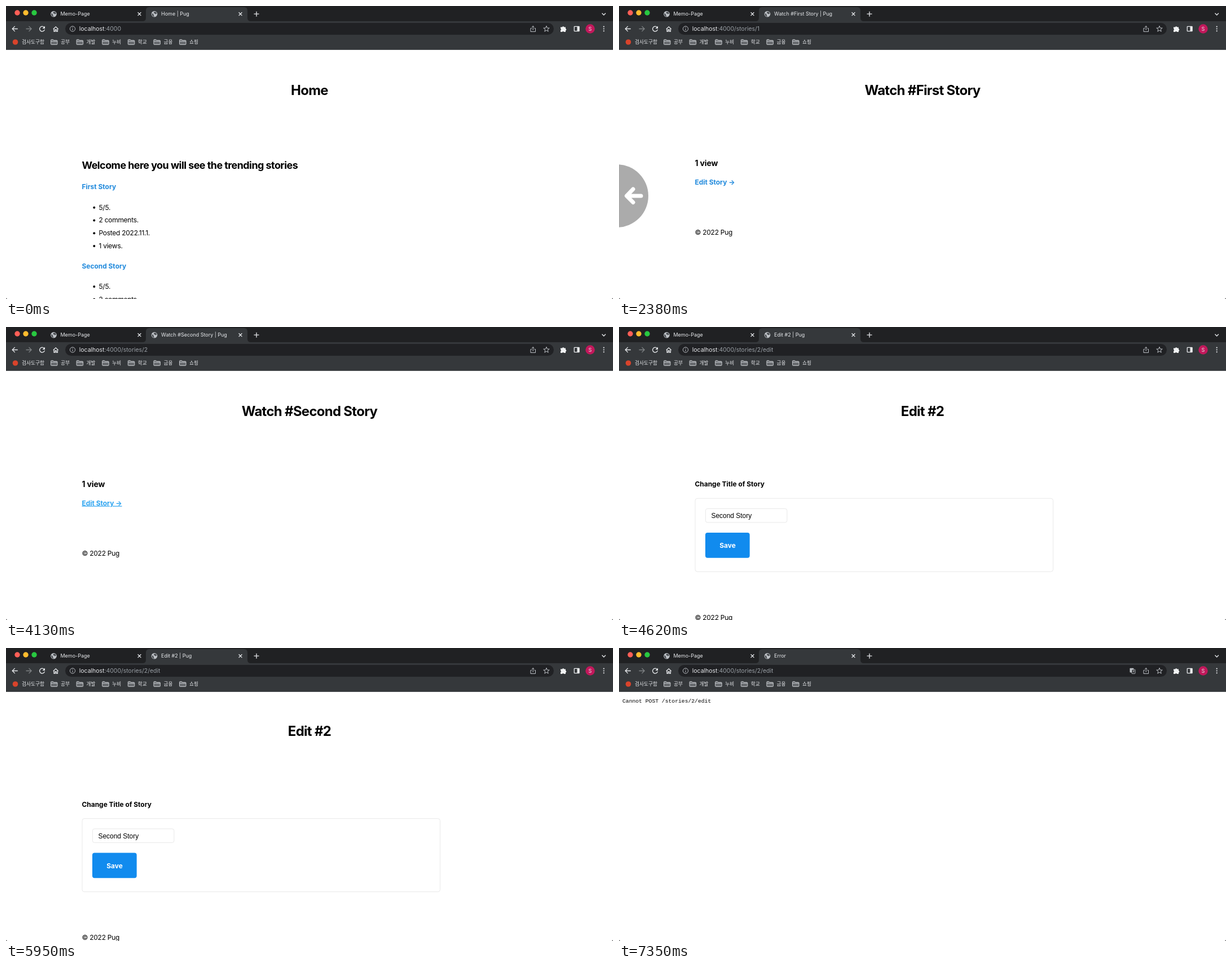
An HTML page that plays this animation: 1076x520 px, repeating every 9.03 s.

```html
<!DOCTYPE html>
<html lang="en">
<head>
<meta charset="utf-8">
<title>Browser walkthrough</title>
<style>
  html, body { margin: 0; width: 100%; height: 100%; overflow: hidden; background: #202124; }
  svg { display: block; width: 1076px; height: 520px; font: 11.95px Inter, sans-serif; }
  text { white-space: pre; }
  .h1 { font-size: 23.9px; font-weight: 700; letter-spacing: -.028em; text-anchor: middle; }
  .h2 { font-size: 17.93px; font-weight: 700; letter-spacing: -.03em; }
  .h3 { font-size: 13.98px; font-weight: 700; letter-spacing: -.01em; }
  .body { letter-spacing: -.02em; }
  .bold { font-weight: 700; }
  .link { font-weight: 700; fill: #1f89dc; }
  .hover { fill: #2ba3f0; text-decoration: underline; }
  .field { font-family: "Liberation Sans", Arial, sans-serif; }
  .mono { font: 9.71px "Liberation Mono", monospace; }
  .tab { font-size: 8.97px; fill: #e8eaed; }
  .url { font-size: 10.46px; fill: #9aa0a6; }
  .mark { font: 500 8.7px "Noto Sans CJK KR", "Noto Sans CJK", sans-serif; fill: #e8eaed; }
  .icon { fill: none; stroke: #e8eaed; stroke-width: 1.3; }
  .soft { stroke: #bdc1c6; stroke-width: 1; }
</style>
</head>
<body>
<svg viewBox="0 0 1076 520" xmlns="http://www.w3.org/2000/svg">
  <rect y="78" width="1076" height="442" rx="3" fill="#fff"/>
  <rect y="78" width="1076" height="20" fill="#fff"/>
  <g id="page"></g>
  <g id="chrome"></g>
  <g id="state"></g>
  <g id="swipe">
    <circle cx="-4" cy="337" r="56" fill="#ababab"/>
    <path d="M39 337H14M25 325L13.5 337L25 348.500" fill="none" stroke="#fff" stroke-width="7" stroke-linecap="round" stroke-linejoin="round"/>
  </g>
</svg>
<script>
const LOOP = 9030;
const layer = id => document.getElementById(id);
const text = (x, y, cls, str, extra = '') => `<text x="${x}" y="${y}" class="${cls}" ${extra}>${str}</text>`;
const icon = (d, cls = '', extra = '') => `<path d="${d}" class="icon ${cls}" ${extra}/>`;
const dot = (x, y, r, fill) => `<circle cx="${x}" cy="${y}" r="${r}" fill="${fill}"/>`;
const box = (x, y, w, h, r, extra) => `<rect x="${x}" y="${y}" width="${w}" height="${h}" rx="${r}" ${extra}/>`;
const link = (y, str, hover) => text(134.5, y, hover ? 'link hover' : 'link', str);

// Browser frame
const globe = x => dot(x, 14.2, 5.3, '#bdc1c6') +
  `<path d="M${x - 4.2} 12.5l3 2.800v1.500l1 2.200c-2.500-.3-4.500-2.500-4-6.500M${x - .5} 10.200l3.700.6 1 2.700-2.500 1-.8-1.500-2 .2z" fill="#45484c"/>`;
const cross = (x, y, s) => icon(`M${x - s} ${y - s}l${2 * s} ${2 * s}m0 ${-2 * s}l${-2 * s} ${2 * s}`);
const arrow = (x, way, color) =>
  icon(`M${x - 4.800 * way} 40.500h${9.6 * way}m${-4.6 * way} -4.600l${4.6 * way} 4.600l${-4.6 * way} 4.600`, '', `style="stroke:${color}"`);

function folder(label, i) {
  const x = 79.5 + 45.6 * i;
  return `<path d="M${x} 60.500q0-1 1-1h3l1.500 1.500h5q1 0 1 1v5.500q0 1-1 1h-9.500q-1 0-1-1z" fill="#686b6f" stroke="#c6c9cc"/>` +
    icon(`M${x} 62.500h11.500`, 'soft') + text(x + 17.5, 67, 'mark', label);
}

function star(cx, cy) {
  const points = Array.from({ length: 10 }, (_, i) => {
    const a = i * Math.PI / 5 - Math.PI / 2, r = i % 2 ? 2.3 : 5.5;
    return `${(cx + r * Math.cos(a)).toFixed(2)} ${(cy + r * Math.sin(a)).toFixed(2)}`;
  });
  return icon(`M${points.join('L')}z`, 'soft');
}

layer('chrome').innerHTML =
  box(0, 0, 1076, 27, 0, 'fill="#202123"') +
  box(0, 27, 1076, 51, 0, 'fill="#35383b"') +
  box(0, 77, 1076, 1, 0, 'fill="#4b4e51"') +
  '<path d="M242 27q6 0 6-6V8q0-6 6-6h168q6 0 6 6v13q0 6 6 6z" fill="#35383b"/>' +
  ['#ff5f57', '#febc2e', '#28c840'].map((c, i) => dot(20 + 15 * i, 12, 4.7, c)).join('') +
  globe(84.5) + text(96.5, 17.3, 'tab', 'Memo-Page') +
  cross(236.5, 14.2, 2.9) + cross(415.5, 14.2, 2.9) +
  icon('M439.500 14.200h9M444 9.700v9', '', 'stroke-width="1.6"') +
  icon('M1056.500 12.800l3.200 3.200 3.200-3.200') +
  arrow(16, -1, '#e8eaed') +
  icon('M83.800 41l4.400-4.200 4.400 4.200M85 40v5h2.200v-3h2v3h2.200v-5') +
  box(105, 30, 866, 21, 10.5, 'fill="#202124"') +
  '<circle cx="118" cy="40.500" r="4.600" class="icon soft"/>' + icon('M118 40v3M118 37.600v1.200', 'soft') +
  icon('M932 39.500h-2v6h8.500v-6h-2M934.200 43v-7.500m-2.200 2.200l2.200-2.200 2.200 2.200', 'soft') +
  star(958, 40.8) +
  '<path d="M983 37.500h3a1.800 1.800 0 0 1 3.400 0h2.600v2.800a1.700 1.700 0 0 1 0 3.300V46h-3a1.700 1.700 0 0 0-3 0h-3v-3a1.700 1.700 0 0 0 0-3z" fill="#f1f3f4"/>' +
  box(1007.3, 36.3, 8.8, 8.4, .5, 'class="icon"') + box(1012.5, 36.3, 3.6, 8.4, 0, 'fill="#f1f3f4"') +
  dot(1035.5, 40.5, 8.2, '#c2185b') +
  text(1035.5, 43.6, 'tab', 'S', 'text-anchor="middle"') +
  [36.7, 40.5, 44.3].map(y => dot(1059.7, y, 1.1, '#e8eaed')).join('') +
  dot(16.5, 64, 4.8, '#d9432b') + text(28, 67, 'mark', '검사도구함') +
  ['공부', '개발', '누비', '학교', '금융', '쇼핑'].map(folder).join('');

// Page contents
const heading = str => text(538, 157.5, 'h1', str);
const footer = y => text(134.5, y, 'body', '© 2022 Pug');

function story(y, title, hover) {
  const facts = ['5/5.', '2 comments.', 'Posted 2022.11.1.', '1 views.'];
  return link(y, title, hover) + facts.map((fact, i) => {
    const base = y + 36.4 + 22.73 * i;
    return dot(156.3, base - 3.8, 2, '#000') + text(164.5, base, 'body', fact);
  }).join('');
}

const home = hovered => ({
  title: 'Home | Pug', path: '',
  body: heading('Home') +
    text(134.5, 289.3, 'h2', 'Welcome here you will see the trending stories') +
    story(325.1, 'First Story', hovered === 1) + story(465.5, 'Second Story', hovered === 2)
});
const watch = (id, name, hover) => ({
  title: `Watch #${name} Story | Pug`, path: `/stories/${id}`,
  body: heading(`Watch #${name} Story`) + text(134.5, 283.8, 'h3', '1 view') +
    link(316.5, 'Edit Story →', hover) + footer(406.2)
});
const edit = (scroll = 0) => ({
  title: 'Edit #2 | Pug', path: '/stories/2/edit',
  body: `<g transform="translate(0 ${-scroll})">` + heading('Edit #2') +
    text(134.5, 283.3, 'bold', 'Change Title of Story') +
    box(135, 304.2, 634.5, 130, 4, 'fill="#fff" stroke="#e6e6e6" stroke-width=".9"') +
    box(153.4, 322.4, 144.5, 24.5, 3.5, 'fill="#fff" stroke="#e6e6e6" stroke-width=".9"') +
    text(163.5, 339, 'field', 'Second Story') +
    box(153, 365, 78.7, 44.8, 4, 'fill="#118bee"') +
    text(192.5, 392, 'bold', 'Save', 'fill="#fff" text-anchor="middle"') + footer(519.7) + '</g>'
});
const failure = {
  title: 'Error', path: '/stories/2/edit', translate: true,
  body: text(6, 97.2, 'mono', 'Cannot POST /stories/2/edit')
};

const loading = view => ({ ...view, loading: true });
const forward = view => ({ ...view, forward: true });

const timeline = [
  [0, home()],
  [70, home(1)],
  [490, loading(home(1))],
  [560, loading(watch(1, 'First', true))],
  [700, watch(1, 'First', true)],
  [910, watch(1, 'First')],
  [1610, watch(1, 'First', true)],
  [2030, watch(1, 'First')],
  [2380, { ...watch(1, 'First'), swipe: 1 }],
  [2450, { ...forward(home()), swipe: .5 }],
  [2520, forward(home())],
  [3220, forward(home(2))],
  [3430, loading(home(2))],
  [3500, watch(2, 'Second')],
  [4130, watch(2, 'Second', true)],
  [4550, loading(watch(2, 'Second', true))],
  [4620, edit()],
  [5810, edit(.75)],
  [5880, edit(1.2)],
  [5950, edit(1.5)],
  [6160, edit(1)],
  [6230, edit(.5)],
  [6370, edit(.4)],
  [6510, edit()],
  [7350, failure]
];

const reload = icon('M67.600 37.700a4.500 4.500 0 1 0 .9 4', '', 'stroke-width="1.5"') +
  '<path d="M69 35.500v4.500h-4.500z" fill="#e8eaed"/>';
const spinner = icon('M263 9.200a5 5 0 1 1-5 5', '', 'style="stroke:#8ab4f8"');
const translateIcon = box(905.5, 35.8, 6.8, 7.6, .8, 'fill="#bdc1c6"') +
  box(909, 38.2, 6, 7.3, .8, 'fill="#202124" stroke="#bdc1c6" stroke-width=".9"') +
  icon('M910.500 40.500h3.200M912 39.500v1m1 0q-.5 2-2.200 3m.2-2l2.400 2', 'soft', 'style="stroke-width:.7"');

function show(view) {
  layer('page').innerHTML = view.body;
  layer('state').innerHTML =
    (view.loading ? spinner : globe(263)) + text(275, 17.3, 'tab', view.title) +
    (view.loading ? cross(64.3, 40.5, 3.8) : reload) +
    arrow(40.3, 1, view.forward ? '#e8eaed' : '#7f8285') +
    text(129.8, 44.3, 'url', `<tspan fill="#e8eaed">localhost</tspan>:4000${view.path}`) +
    (view.translate ? translateIcon : '');
  layer('swipe').setAttribute('opacity', view.swipe || 0);
}

const start = performance.now();
let current;
function tick() {
  const time = (performance.now() - start) % LOOP;
  const view = timeline.findLast(([from]) => from <= time)[1];
  if (view !== current) show(current = view);
  requestAnimationFrame(tick);
}
tick();
</script>
</body>
</html>
```
